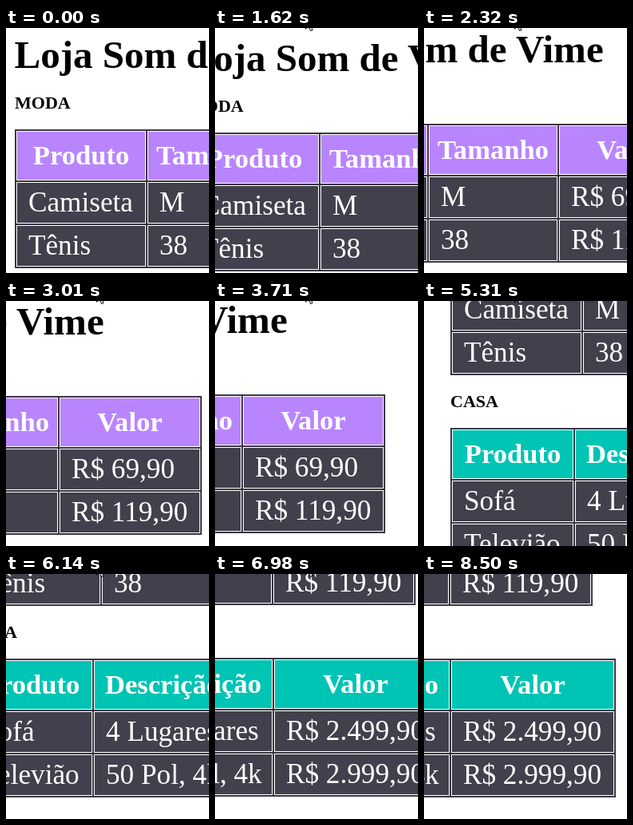
These frames come from a looping animation (254x307 px, 8.96 s). An HTML page:

```html
<!DOCTYPE html>
<html lang="pt">
<head>
<meta charset="utf-8">
<title>Loja</title>
<style>
  html, body { margin: 0; width: 100%; height: 100%; overflow: hidden; background: #fff; }
  svg { display: block; width: 100vw; height: 100vh; }
  text { font-family: "Liberation Serif", "Times New Roman", serif; white-space: pre; }
  rect { shape-rendering: crispEdges; }
  .title { font-size: 49px; font-weight: bold; }
  .section { font-size: 22px; font-weight: bold; }
  .head { font-size: 34.6px; font-weight: bold; fill: #fff; text-anchor: middle; }
  .cell { font-size: 35.2px; fill: #fff; }
</style>
</head>
<body>
<svg id="stage" viewBox="0 0 254 307" preserveAspectRatio="none">
  <g id="page"></g>
  <path id="cursor" d="M.5 .5V16.2L4.1 12.8L6.6 18.5L9 17.5L6.6 11.9H11.6Z"
    fill="#fff" stroke="#000" stroke-width="1"/>
</svg>
<script>
const LOOP = 8960, STEP = 69.6, ORIGIN = 1480;
const EDGE = '#393741', CELL = '#42404c';
const page = document.getElementById('page');
const cursor = document.getElementById('cursor');

function add(tag, attrs, content) {
  const el = document.createElementNS('http://www.w3.org/2000/svg', tag);
  for (const k in attrs) el.setAttribute(k, attrs[k]);
  if (content) el.textContent = content;
  page.appendChild(el);
}

const box = (x, y, width, height, fill) => add('rect', { x, y, width, height, fill });
const label = (x, y, cls, content) => add('text', { x, y, class: cls }, content);

// cols: [left, right] of each column; rows[0] is the header
function table(top, cols, color, rows) {
  const right = cols[cols.length - 1][1];
  box(11, top, right - 9, 174, EDGE);
  rows.forEach((row, r) => {
    const y = top + [2, 66, 120][r], h = r ? 52 : 62;
    row.forEach((content, c) => {
      const [x0, x1] = cols[c];
      box(x0, y, x1 - x0, h, '#fff');
      box(x0 + 1, y + 1, x1 - x0 - 2, h - 2, r ? CELL : color);
      if (r) label(x0 + 15, y + 37, 'cell', content);
      else label((x0 + x1) / 2, y + 42, 'head', content);
    });
  });
}

label(10.5, 50, 'title', 'Loja Som de Vime');
label(11, 101, 'section', 'MODA');
table(127, [[13, 175], [177, 338], [340, 516]], '#b985ff', [
  ['Produto', 'Tamanho', 'Valor'],
  ['Camiseta', 'M', 'R$ 69,90'],
  ['Tênis', '38', 'R$ 119,90']
]);
label(11, 341, 'section', 'CASA');
table(367, [[13, 165], [167, 339], [341, 545]], '#00c4b4', [
  ['Produto', 'Descrição', 'Valor'],
  ['Sofá', '4 Lugares', 'R$ 2.499,90'],
  ['Televião', '50 Pol, 4k', 'R$ 2.999,90']
]);

// Keys are [time, x, y]
const pan = [
  [1430, 0, 0], [1620, -45, 4], [2320, -172, -7], [3010, -273, -8],
  [3220, -291, -9], [3900, -307, -10], [4060, -307, -10], [4400, -192, -24],
  [4960, -2, -130], [5310, 22, -208], [5870, -2, -256], [6400, -130, -263],
  [6980, -267, -262], [7330, -307, -261]
];
const pointer = [
  [125, 254, 307], [130, 239, 273], [950, 113, -15],
  [7590, 113, -15], [8430, 224, 310]
];

// Monotone cubic through the keys, at rest at both ends
function at(keys, t, axis) {
  const last = keys.length - 1;
  if (t <= keys[0][0]) return keys[0][axis];
  if (t >= keys[last][0]) return keys[last][axis];
  const slope = i => (keys[i + 1][axis] - keys[i][axis]) / (keys[i + 1][0] - keys[i][0]);
  const tangent = i => {
    if (i === 0 || i === last) return 0;
    const a = slope(i - 1), b = slope(i);
    return a * b > 0 ? 2 * a * b / (a + b) : 0;
  };
  let i = 0;
  while (t > keys[i + 1][0]) i++;
  const d = keys[i + 1][0] - keys[i][0], u = (t - keys[i][0]) / d;
  const p = keys[i][axis], q = keys[i + 1][axis], v = 1 - u;
  return p * v * v * (1 + 2 * u) + q * u * u * (3 - 2 * u)
    + d * u * v * (tangent(i) * v - tangent(i + 1) * u);
}

function move(el, keys, t) {
  const x = Math.round(at(keys, t, 1)), y = Math.round(at(keys, t, 2));
  el.setAttribute('transform', `translate(${x} ${y})`);
}

function draw(t) {
  // The view advances in discrete steps, like a screen recording
  const held = ORIGIN + Math.floor((t - ORIGIN + 8) / STEP) * STEP;
  move(page, pan, held);
  move(cursor, pointer, t);
}

const start = performance.now();
function tick() {
  draw((performance.now() - start) % LOOP);
  requestAnimationFrame(tick);
}
tick();
</script>
</body>
</html>
```
